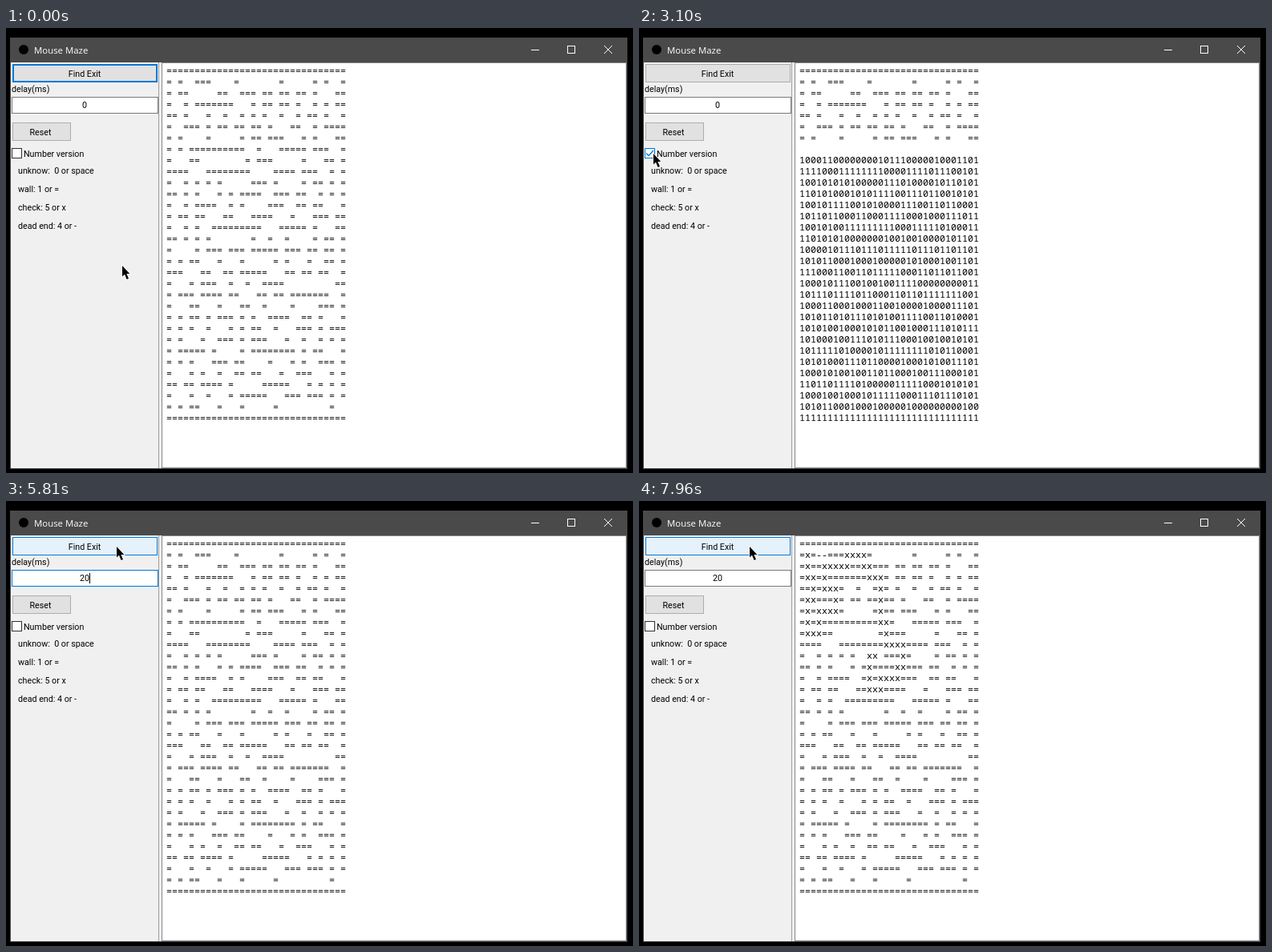
Write an HTML page with a canvas that moves like this. It is 782x556 px and loops after 7.99 s.

```html
<!DOCTYPE html>
<html lang="en">
<head>
<meta charset="utf-8">
<title>Mouse Maze</title>
<style>
html, body { margin: 0; width: 100%; height: 100%; overflow: hidden; background: #000; }
canvas { display: block; }
</style>
</head>
<body>
<canvas id="stage" width="782" height="556"></canvas>
<script>
const LOOP = 7990;
const UI_FONT = '10.7px Roboto, sans-serif';
const TITLE_FONT = '11.4px "Open Sans", sans-serif';
const MAZE_FONT = '11.667px "Noto Sans Mono", monospace';
const BLUE = '#0078d7';

const maze = `
================================
= =  ===    =       =     = =  =
= ==     ==  === == == == =   ==
=  = =======   = == == =  = = ==
== =   =  =  = = =  =  = == =  =
=  === = == == == =   ==  = ====
= =    =     = == ===   = =   ==
= = ==========  =   ===== ===  =
=   ==        = ===     =   == =
====   ========    ==== ===  = =
=  = = = =     === =    = == = =
== = =   = = ====  === ==  = = =
=  = ====  = =    ===  == ==   =
= == ==   ==   ====   =   === ==
=  = =  =========   ===== =   ==
== = = =       =  =  =    = == =
=    = === === ===== === == == =
= = ==   =   =     = =   =  == =
===   ==  == =====   == == ==  =
=   = ===  =  =  ====         ==
= === ==== ==   == == =======  =
=   ==   =   ==  =    =    === =
= = == = === = =  ====  == =   =
= = =  =   = = ==  =   === = ===
= =   =  === = ===   =  =  = = =
= ===== =    = ======== = ==   =
= = =   === ==    =   = =  === =
=   = =  =  == ==   =  ===   = =
== == ==== =     =====   = = = =
=   =  =   = =====   === === = =
= = ==   =   =     =         =
================================`.trim().split('\n').map(row => row.padEnd(32));

// Depth-first walk: 'x' marks a visited cell, '-' a dead end.
function solve() {
  const grid = maze.map(row => [...row]);
  const marks = [];
  const mark = (r, c, ch) => { grid[r][c] = ch; marks.push({ r, c, ch }); };
  function visit(r, c) {
    if (!grid[r] || grid[r][c] !== ' ') return false;
    mark(r, c, 'x');
    if (r === 30 && c === 31) return true;
    if (visit(r - 1, c) || visit(r, c + 1) || visit(r + 1, c) || visit(r, c - 1)) return true;
    mark(r, c, '-');
    return false;
  }
  visit(1, 1);
  return marks;
}
const marks = solve();

const ctx = document.getElementById('stage').getContext('2d');
const clamp = v => Math.max(0, Math.min(1, v));
const ramp = (t, from, to) => clamp((t - from) / (to - from));
const during = (t, from, to) => t >= from && t < to;
const inside = (p, x, y, w, h) => p.x >= x && p.x < x + w && p.y >= y && p.y < y + h;

function fill(x, y, w, h, color) {
  ctx.fillStyle = color;
  ctx.fillRect(x, y, w, h);
}

function box(x, y, w, h, border, color, line = 1) {
  fill(x, y, w, h, border);
  fill(x + line, y + line, w - 2 * line, h - 2 * line, color);
}

function text(str, x, y, align = 'left', font = UI_FONT, color = '#000') {
  ctx.font = font;
  ctx.textAlign = align;
  ctx.fillStyle = color;
  ctx.fillText(str, x, y);
}

function polyline(points, color, width) {
  ctx.beginPath();
  points.forEach(([x, y]) => ctx.lineTo(x, y));
  ctx.strokeStyle = color;
  ctx.lineWidth = width;
  ctx.stroke();
}

// Pointer moves: start, end, from, to
const moves = [
  [820, 1490, [145, 297], [18, 157]],
  [3620, 4160, [18, 157], [117, 96]],
  [5270, 5810, [117, 96], [138, 57]]
];

function pointerAt(t) {
  const [start, end, a, b] = moves.filter(m => t >= m[0]).pop() || moves[0];
  const k = ramp(t, start, end);
  const e = k * k * (3 - 2 * k);
  return { x: Math.round(a[0] + (b[0] - a[0]) * e), y: Math.round(a[1] + (b[1] - a[1]) * e) };
}

function drawFrame() {
  fill(0, 0, 782, 556, '#000');
  fill(5, 12, 770, 539, '#4a4a4a');
  fill(6, 43, 768, 507, '#f0f0f0');
  fill(190, 43, 1, 507, '#a0a0a0');
  box(194, 43, 580, 507, '#828790', '#fff');

  ctx.fillStyle = '#000';
  ctx.beginPath();
  ctx.arc(22, 27, 6, 0, 7);
  ctx.fill();
  text('Mouse Maze', 35, 32, 'left', TITLE_FONT, '#fff');

  fill(655, 27, 10, 1, '#fff');
  box(700, 22, 10, 10, '#fff', '#4a4a4a');
  polyline([[746, 22], [756, 32]], '#fff', 1);
  polyline([[756, 22], [746, 32]], '#fff', 1);
}

function drawFindButton(t, pointer) {
  if (t < 2050) box(8, 45, 181, 23, BLUE, '#e1e1e1', 2);
  else if (inside(pointer, 8, 45, 181, 23)) box(8, 45, 181, 23, BLUE, '#e5f1fb');
  else box(8, 45, 181, 23, '#adadad', '#e1e1e1');
  if (t >= 5930) {
    ctx.globalAlpha = 1 - ramp(t, 6090, 6240);
    box(8, 45, 181, 23, '#005499', '#cce4f7');
    ctx.globalAlpha = 1;
  }
  text('Find Exit', 98, 61, 'center');
}

function drawDelayField(t, pointer) {
  const focused = during(t, 4530, 5930);
  const hover = inside(pointer, 7, 86, 183, 21);
  box(7, 86, 183, 21, hover ? '#171717' : focused ? BLUE : '#7a7a7a', '#fff');
  const value = t < 4650 ? '0' : t < 4710 ? '' : t < 4780 ? '2' : '20';
  text(value, 98, 100, 'center');
  if (focused && !during(t, 5275, 5780)) {
    const caretX = Math.round(98 + ctx.measureText(value).width / 2);
    fill(caretX, 90, 1, 13, '#000');
  }
}

function drawCheckbox(t, pointer) {
  const hover = inside(pointer, 7, 147, 92, 20);
  box(7, 150, 13, 13, hover ? BLUE : '#333', '#fff');
  ctx.globalAlpha = t < 3100 ? ramp(t, 2080, 2260) : 1 - ramp(t, 3130, 3280);
  polyline([[9, 156.5], [12, 159.5], [18, 153]], BLUE, 1.3);
  ctx.globalAlpha = 1;
  text('Number version', 22, 161);
}

function drawPanel(t, pointer) {
  drawFindButton(t, pointer);
  text('delay(ms)', 7, 80);
  drawDelayField(t, pointer);
  box(8, 118, 73, 23, '#adadad', '#e1e1e1');
  text('Reset', 43, 134, 'center');
  drawCheckbox(t, pointer);
  ['unknow:  0 or space', 'wall: 1 or =', 'check: 5 or x', 'dead end: 4 or -']
    .forEach((label, i) => text(label, 15, 182 + 23 * i));
}

function marksShown(t) {
  if (t < 5927) return 0;
  if (t < 6426) return 1 + Math.floor((t - 5927) / 33.3);
  return 16 + Math.floor((t - 6426) / 31.9);
}

function drawMaze(t) {
  const repainting = during(t, 3100, 3130);
  const grid = maze.map((row, r) => {
    if (repainting && r === 7) return [];
    const digits = during(t, 2110, 3100) || (repainting && r > 7);
    return [...row].map(ch => digits ? (ch === '=' ? '1' : '0') : ch);
  });
  marks.slice(0, marksShown(t)).forEach(({ r, c, ch }) => { grid[r][c] = ch; });
  grid.forEach((row, r) => row.forEach((ch, c) => {
    if (ch !== ' ') text(ch, 200 + 7 * c, 57 + 14 * r, 'left', MAZE_FONT);
  }));
}

function drawPointer({ x, y }) {
  if (inside({ x, y }, 8, 87, 181, 19)) {
    fill(x, y - 7, 1, 15, '#000');
    for (const edge of [y - 8, y + 7]) {
      fill(x - 3, edge, 3, 1, '#000');
      fill(x + 1, edge, 3, 1, '#000');
    }
    return;
  }
  const arrow = new Path2D('M0 0V13.5L3 10.8L5.6 17L8 16L5.4 10H9.3Z');
  ctx.save();
  ctx.translate(x, y);
  ctx.strokeStyle = '#fff';
  ctx.lineWidth = 1.4;
  ctx.stroke(arrow);
  ctx.fillStyle = '#000';
  ctx.fill(arrow);
  ctx.restore();
}

const started = performance.now();
function render() {
  const t = (performance.now() - started) % LOOP;
  const pointer = pointerAt(t);
  drawFrame();
  drawPanel(t, pointer);
  drawMaze(t);
  drawPointer(pointer);
  requestAnimationFrame(render);
}
render();
</script>
</body>
</html>
```
